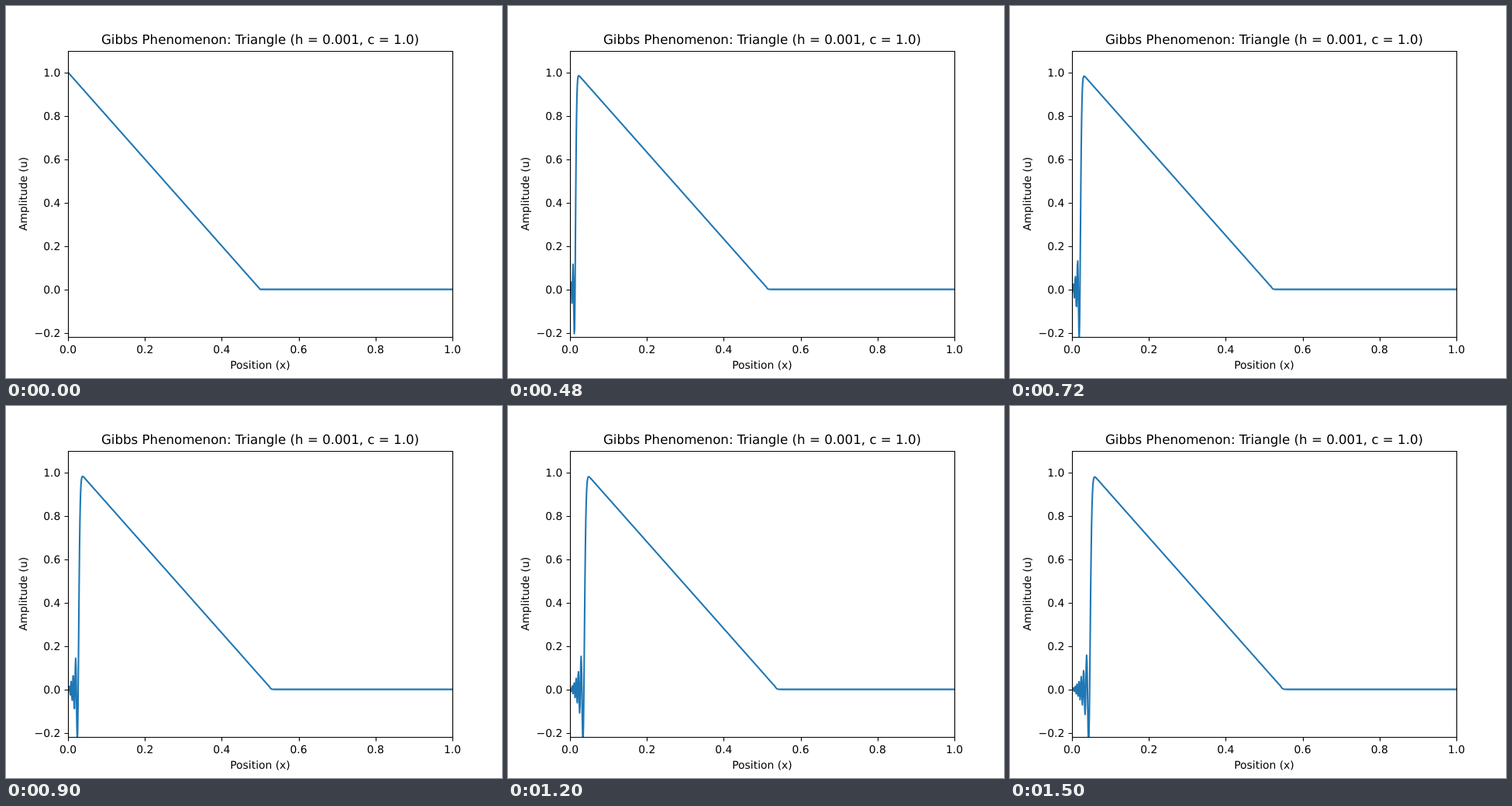
An HTML page for the animation above (1530 ms loop, 640x480 px).

```html
<!DOCTYPE html>
<html lang="en">
<head>
<meta charset="utf-8">
<title>Gibbs Phenomenon</title>
<style>
  html, body { margin: 0; width: 100%; height: 100%; overflow: hidden; background: #fff; }
  svg { display: block; }
  text { font-family: "DejaVu Sans", sans-serif; font-size: 13.889px; text-rendering: geometricPrecision; }
  .title { font-size: 16.667px; }
  .mid { text-anchor: middle; }
  .end { text-anchor: end; }
  #axes { fill: none; stroke: #000; stroke-width: 1.11; }
  #curve { fill: none; stroke: #1f77b4; stroke-width: 2.083; stroke-linejoin: round; stroke-linecap: square; }
</style>
</head>
<body>
<svg width="640" height="480" viewBox="0 0 640 480">
  <clipPath id="plot"><rect x="80" y="58" width="496" height="369"/></clipPath>
  <g clip-path="url(#plot)"><path id="curve"/></g>
  <path id="axes"/>
  <g id="labels">
    <text class="mid title" x="328" y="49">Gibbs Phenomenon: Triangle (h = 0.001, c = 1.0)</text>
    <text class="mid" x="328" y="468">Position (x)</text>
    <text class="mid" transform="translate(27 242.4) rotate(-90)">Amplitude (u)</text>
  </g>
</svg>
<script>
const CELLS = 1000, FRAMES = 51, FRAME_MS = 30;
const px = x => 80 + 496 * x;
const py = u => 365.6 - 280 * u;
const $ = id => document.getElementById(id);

function addLabel(value, x, y, cls) {
  const t = document.createElementNS("http://www.w3.org/2000/svg", "text");
  t.setAttribute("class", cls);
  t.setAttribute("x", x);
  t.setAttribute("y", y);
  t.textContent = value.toFixed(1).replace("-", "\u2212");
  $("labels").append(t);
}

function drawAxes() {
  let d = "M80.5 58.5H576.5V427.5H80.5Z";
  for (let i = -1; i <= 5; i++) {
    const v = i / 5;
    d += `M75.5 ${Math.round(py(v)) + 0.5}h5`;
    addLabel(v, 70.3, Math.round(py(v) + 5), "end");
    if (i < 0) continue;
    d += `M${Math.round(px(v)) + 0.5} 427.5v5`;
    addLabel(v, px(v), 448, "mid");
  }
  $("axes").setAttribute("d", d);
}

// Advection by central differences in space, fixed end values
const slope = u => u.map((_, j) => j && j < CELLS ? (u[j - 1] - u[j + 1]) / 2 : 0);
const add = (u, k, s) => u.map((v, j) => v + s * k[j]);

// One Runge-Kutta step with dt = h / c
function step(u) {
  const a = slope(u), b = slope(add(u, a, 0.5)), c = slope(add(u, b, 0.5)), d = slope(add(u, c, 1));
  return u.map((v, j) => v + (a[j] + 2 * b[j] + 2 * c[j] + d[j]) / 6);
}

const toPath = u => "M" + Array.from(u, (v, j) => px(j / CELLS).toFixed(2) + " " + py(v).toFixed(2)).join("L");

function solve() {
  let u = Float64Array.from({ length: CELLS + 1 }, (_, j) => Math.max(0, 1 - 2 * j / CELLS));
  const paths = [toPath(u)];
  u[0] = 0; // inflow boundary
  while (paths.length < FRAMES) {
    u = step(u);
    paths.push(toPath(u));
  }
  return paths;
}

drawAxes();
const paths = solve();
let shown = -1;

function draw() {
  const i = Math.floor(performance.now() / FRAME_MS) % FRAMES;
  if (i !== shown) $("curve").setAttribute("d", paths[shown = i]);
  requestAnimationFrame(draw);
}
draw();
</script>
</body>
</html>
```
